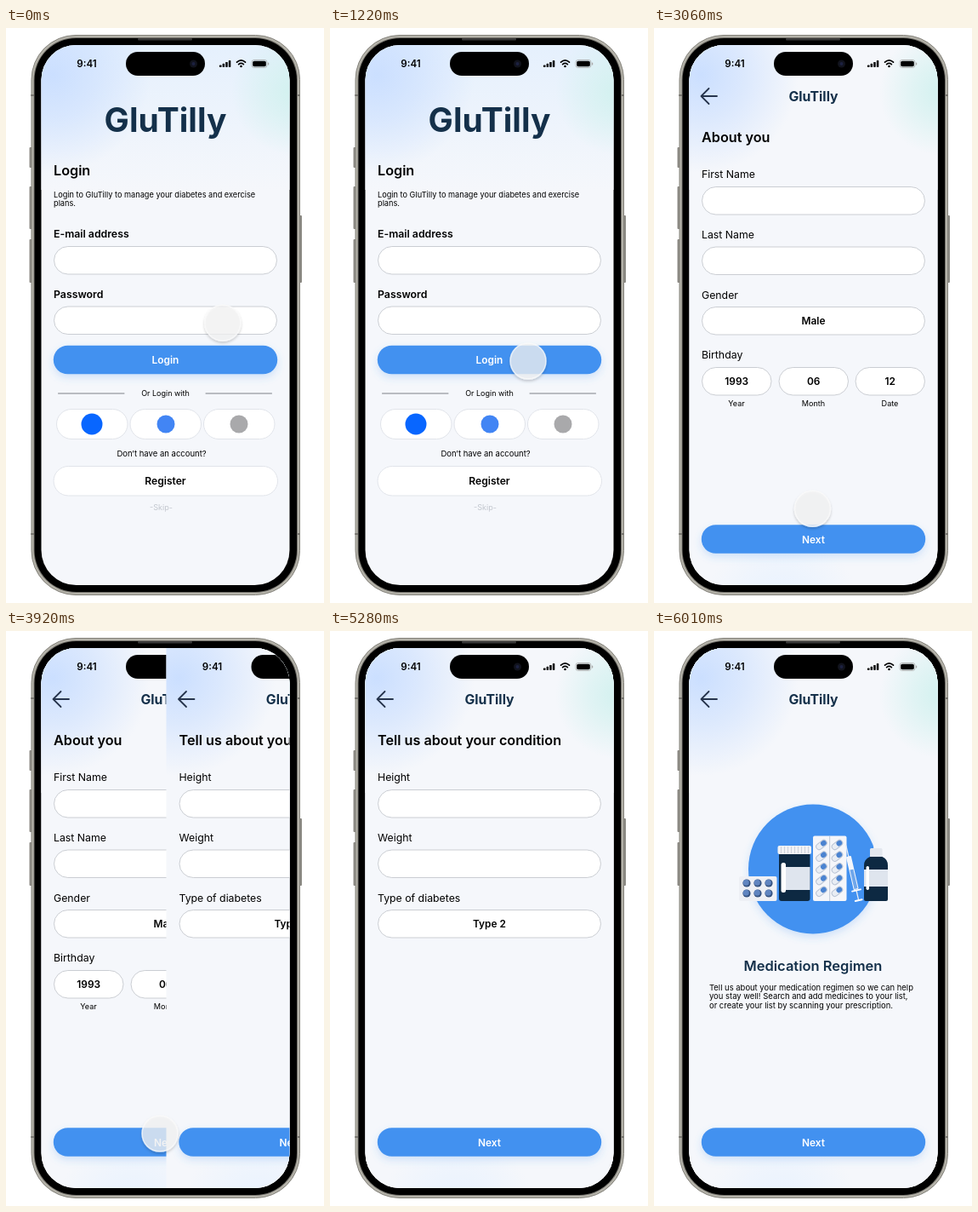
Write an HTML page that moves like this. It is 374 px wide and 675 px high and loops after 6.92 s.

```html
<!DOCTYPE html>
<html lang="en">
<head>
<meta charset="utf-8">
<title>App onboarding</title>
<style>
  html, body { margin: 0; width: 100%; height: 100%; overflow: hidden; background: #fff; }
  svg { display: block; width: 374px; height: 675px; font-family: Inter, "Open Sans", sans-serif; }
</style>
</head>
<body>
<svg id="stage" viewBox="0 0 374 675"></svg>
<script>
const LOOP = 6920, SCREEN_W = 293;
const NAVY = '#14304a', BLUE = '#4291f0', BRAND = 'GluTilly';

const rect = (x, y, w, h, r, fill, extra = '') =>
  `<rect x="${x}" y="${y}" width="${w}" height="${h}" rx="${r}" fill="${fill}" ${extra}/>`;
const circle = (x, y, r, fill, extra = '') =>
  `<circle cx="${x}" cy="${y}" r="${r}" fill="${fill}" ${extra}/>`;
const path = (d, color, width = 1) =>
  `<path d="${d}" fill="none" stroke="${color}" stroke-width="${width}" stroke-linecap="round" stroke-linejoin="round"/>`;
const text = (x, y, size, str, weight = 400, fill = '#000', anchor = 'start') =>
  `<text x="${x}" y="${y}" font-size="${size}" font-weight="${weight}" fill="${fill}" text-anchor="${anchor}">${str}</text>`;
const centered = (x, y, size, str, weight, fill) => text(x, y, size, str, weight, fill, 'middle');

const field = (y, value = '', x = 56, w = 263) =>
  rect(x + .5, y + .5, w - 1, 32.5, 16.3, '#fff', 'stroke="#c6c9cf" stroke-width=".9"') +
  centered(x + w / 2, y + 21, 11.9, value, 600);
const button = (y, label) =>
  rect(55.8, y - .3, 263.4, 33.6, 16.8, BLUE, 'filter="url(#glow)"') +
  centered(187.5, y + 21, 11.9, label, 600, '#fff');
const pill = (x, y, w, h) => rect(x, y, w, h, h / 2, '#fff', 'stroke="#e1e4ea"');
const heading = (y, str) => text(56, y, 16.2, str, 600);
const label = (y, str) => text(56, y, 12.3, str);

const statusBar =
  centered(95, 46, 11.6, '9:41', 600) +
  rect(141, 28, 93, 28, 14, '#000') + circle(220.5, 42, 4.5, '#11131c') + circle(220.5, 42, 2, '#1c2140') +
  [0, 1, 2, 3].map(i => rect(251 + i * 3.6, 43.5 - i * 1.8, 2.5, 2.5 + i * 1.8, .7, '#000')).join('') +
  path('M271.5 40.2q5-4.6 10 0M273.6 42.6q2.9-2.5 5.8 0', '#000', 1.7) + circle(276.5, 45, 1.3, '#000') +
  rect(289, 37.5, 18, 9, 2.8, 'none', 'stroke="#aaa" stroke-width=".8"') +
  rect(290.2, 38.7, 15.6, 6.6, 1.7, '#000') + rect(308, 40.5, 1.2, 3, .6, '#aaa');

const fillScreen = (fill, h = 634) => rect(41, 20, SCREEN_W, h, 0, fill);
const backdrop = isLogin =>
  fillScreen('#f5f7fb') + (isLogin ? fillScreen('url(#sky)', 170) : fillScreen('url(#bottom)')) +
  fillScreen('url(#left)') + fillScreen('url(#right)');

const header = path('M74 80H56M64.5 71L55.5 80L64.5 89', '#26344c', 1.8) +
  centered(187.5, 85.5, 15.8, BRAND, 700, NAVY);

const login =
  centered(187.5, 122, 39, BRAND, 700, NAVY) +
  heading(173, 'Login') +
  text(56, 199, 9.2, `Login to ${BRAND} to manage your diabetes and exercise`) +
  text(56, 209.3, 9.2, 'plans.') +
  text(56, 246, 12.3, 'E-mail address', 600) + field(256) +
  text(56, 317, 12.3, 'Password', 600) + field(326.5) +
  button(373, 'Login') +
  path('M61.5 429H139M235 429H312.5', '#7d8087') + centered(187.5, 432, 9, 'Or Login with') +
  [59.5, 146, 232.5].map(x => pill(x, 447.5, 83.5, 35)).join('') +
  circle(101, 465, 12.5, '#0866ff') + circle(188, 465, 10.5, '#4285f4') + circle(274, 465, 10.5, '#a9a9ab') +
  centered(183, 502.5, 9.5, 'Don’t have an account?') +
  pill(56, 514.5, 263.5, 34.5) + centered(187.5, 536, 12.1, 'Register', 600) +
  centered(182.5, 566, 9.1, '-Skip-', 400, '#c3c7cf');

const about = header +
  heading(134, 'About you') +
  label(176, 'First Name') + field(186) +
  label(247, 'Last Name') + field(256.5) +
  label(317.5, 'Gender') + field(327, 'Male') +
  label(388, 'Birthday') +
  [['1993', 'Year', 56], ['06', 'Month', 146.5], ['12', 'Date', 236.5]].map(([value, unit, x]) =>
    field(398, value, x, 82.5) + centered(x + 41, 444, 9.1, unit)).join('') +
  button(583.5, 'Next');

const condition = header +
  heading(134, 'Tell us about your condition') +
  label(176, 'Height') + field(186) +
  label(247, 'Weight') + field(256.5) +
  label(317.5, 'Type of diabetes') + field(327, 'Type 2') +
  button(583.5, 'Next');

function medicines() {
  let s = circle(187, 279.5, 76, BLUE, 'filter="url(#glow)"');
  // small blister pack
  s += rect(100, 288, 44.5, 29, 2, '#eef0f5');
  for (let i = 0; i < 6; i++) {
    const x = 109 + i % 3 * 13, y = 296 + (i > 2) * 12;
    s += circle(x, y, 4.6, '#35527f') + circle(x - .7, y - .7, 3.5, '#6085c0');
  }
  // jar
  s += rect(147, 260, 36.5, 57, 3, '#0d2942') + rect(145.5, 252, 39.5, 10, 2, '#f1f2f5');
  for (let x = 149; x < 184; x += 4) s += rect(x, 253, 1, 8, 0, '#cdd2db');
  s += rect(154, 277, 29.5, 27, 0, '#dfe5ee') + rect(149.5, 272, 5.5, 35, 2.5, '#fff');
  // capsule sheet
  s += rect(187, 240.5, 39.5, 76.5, 2, '#f5f6fa') + rect(206, 241, 1.2, 76, 0, '#c9d0dd');
  for (let i = 0; i < 10; i++) {
    s += `<g transform="translate(${197 + i % 2 * 18.5} ${251 + (i >> 1) * 13.7}) rotate(-38)">` +
      rect(-7.5, -4, 15, 8, 4, '#b9c3d4') + rect(-6.5, -3, 13, 6, 3, '#e9edf4') +
      rect(-.5, -3, 7, 6, 3, '#4b83d0') + '</g>';
  }
  // syringe
  s += '<g transform="translate(233.5 285) rotate(-13)">' +
    path('M0-34V-20M0 20V32', '#e5ebf5', 1.3) + rect(-3, -21, 6, 40, 1, '#f4f6fb') +
    rect(-2, -5, 4, 23, 0, '#6fa6ea') + path('M-5 20H5M-4 32H4', '#fff', 2) + '</g>';
  // dropper bottle
  s += `<path d="M259 249q2.2-3 4.4 0l1 8h-6.4z" fill="#f3f5f8"/>` +
    rect(254, 255, 14.5, 11, 1.5, '#e3e7ee') +
    `<path d="M254 265h14.5q6.5 3 6.5 10v40q0 2-2 2h-24q-2 0-2-2v-40q0-7 7-10z" fill="#0d2942"/>` +
    rect(247, 280, 28, 20, 0, '#dfe5ee') + rect(249.5, 276, 3.5, 28, 1.7, '#fff');
  return s;
}

const regimen = header + medicines() +
  centered(187, 399, 16.5, 'Medication Regimen', 600, NAVY) +
  ['Tell us about your medication regimen so we can help',
   'you stay well! Search and add medicines to your list,',
   'or create your list by scanning your prescription.']
    .map((line, i) => text(65, 422 + i * 10.4, 9.45, line)).join('') +
  button(583.5, 'Next');

const gradient = (id, x, y, r, color) =>
  `<radialGradient id="${id}" gradientUnits="userSpaceOnUse" cx="${x}" cy="${y}" r="${r}">
     <stop stop-color="${color}"/><stop offset=".45" stop-color="${color}" stop-opacity=".6"/>
     <stop offset="1" stop-color="${color}" stop-opacity="0"/></radialGradient>`;

const phone =
  [[140, 24], [186, 50], [248, 51]].map(([y, h]) => rect(27.5, y, 4, h, 1, '#8d8b85')).join('') +
  rect(344, 220, 4, 79, 1, '#8d8b85') +
  rect(30, 8.5, 315.5, 657, 52, '#b5b3aa', 'stroke="#84827b"') +
  rect(32.5, 11, 310.5, 652, 50, '#77756f') +
  path('M30 79H33M342 79H345M30 594H33M342 594H345', '#77756f', 2) +
  rect(33.5, 12, 308.5, 650, 49, '#000') + rect(155, 12, 64, 2.5, 1, '#3a3a3a');

const pages = [login, about, condition, regimen];
document.getElementById('stage').innerHTML = `
  <defs>
    ${gradient('left', 55, 55, 115, '#cbdfff')}
    ${gradient('right', 340, 75, 75, '#d2f1ef')}
    ${gradient('bottom', 150, 680, 90, '#e8f2ff')}
    <linearGradient id="sky" x2="0" y2="1"><stop stop-color="#e5f0fd"/><stop offset="1" stop-color="#f5f7fb"/></linearGradient>
    <filter id="glow" x="-20%" y="-40%" width="140%" height="200%">
      <feDropShadow dx="0" dy="4" stdDeviation="5" flood-color="${BLUE}" flood-opacity=".22"/></filter>
    <filter id="shade" x="-30%" y="-30%" width="160%" height="170%">
      <feDropShadow dx="0" dy="2" stdDeviation="1.8" flood-color="#000" flood-opacity=".22"/></filter>
    <clipPath id="screen">${rect(41.5, 20, SCREEN_W - 1, 634, 41, '#000')}</clipPath>
  </defs>
  ${phone}
  <g clip-path="url(#screen)">
    ${pages.map((page, i) => `<g class="page">${backdrop(i === 0)}${statusBar}${page}</g>`).join('')}
  </g>
  <g id="touch">${circle(0, 0, 21, '#f6f6f6', 'fill-opacity=".74" stroke="#fafafa" stroke-width="1.5" stroke-opacity=".8" filter="url(#shade)"')}</g>`;

const pageNodes = document.querySelectorAll('.page');
const touch = document.getElementById('touch');
const slides = [[1222, 278], [3822, 298], [5690, 310]];

const progress = (t, start, length) => Math.min(1, Math.max(0, (t - start) / length));
const easeOut = (u, power) => 1 - (1 - u) ** power;
const mix = (a, b, k) => a + (b - a) * k;

function draw(t) {
  slides.forEach(([start, length], i) => {
    const x = SCREEN_W * (1 - easeOut(progress(t, start, length), 1.7));
    pageNodes[i + 1].setAttribute('transform', `translate(${x} 0)`);
  });
  const first = easeOut(progress(t, 0, 600), 3);
  const second = easeOut(progress(t, 2790, 550), 3);
  let x = mix(255, 233, first), y = mix(346, 391, first);
  if (t >= 2620) {
    x = mix(223, 181, second);
    y = mix(393, 590, second);
  }
  touch.setAttribute('transform', `translate(${x} ${y})`);
  touch.setAttribute('visibility', t < 5280 ? 'visible' : 'hidden');
}

function tick() {
  draw(performance.now() % LOOP);
  requestAnimationFrame(tick);
}
tick();
</script>
</body>
</html>
```
